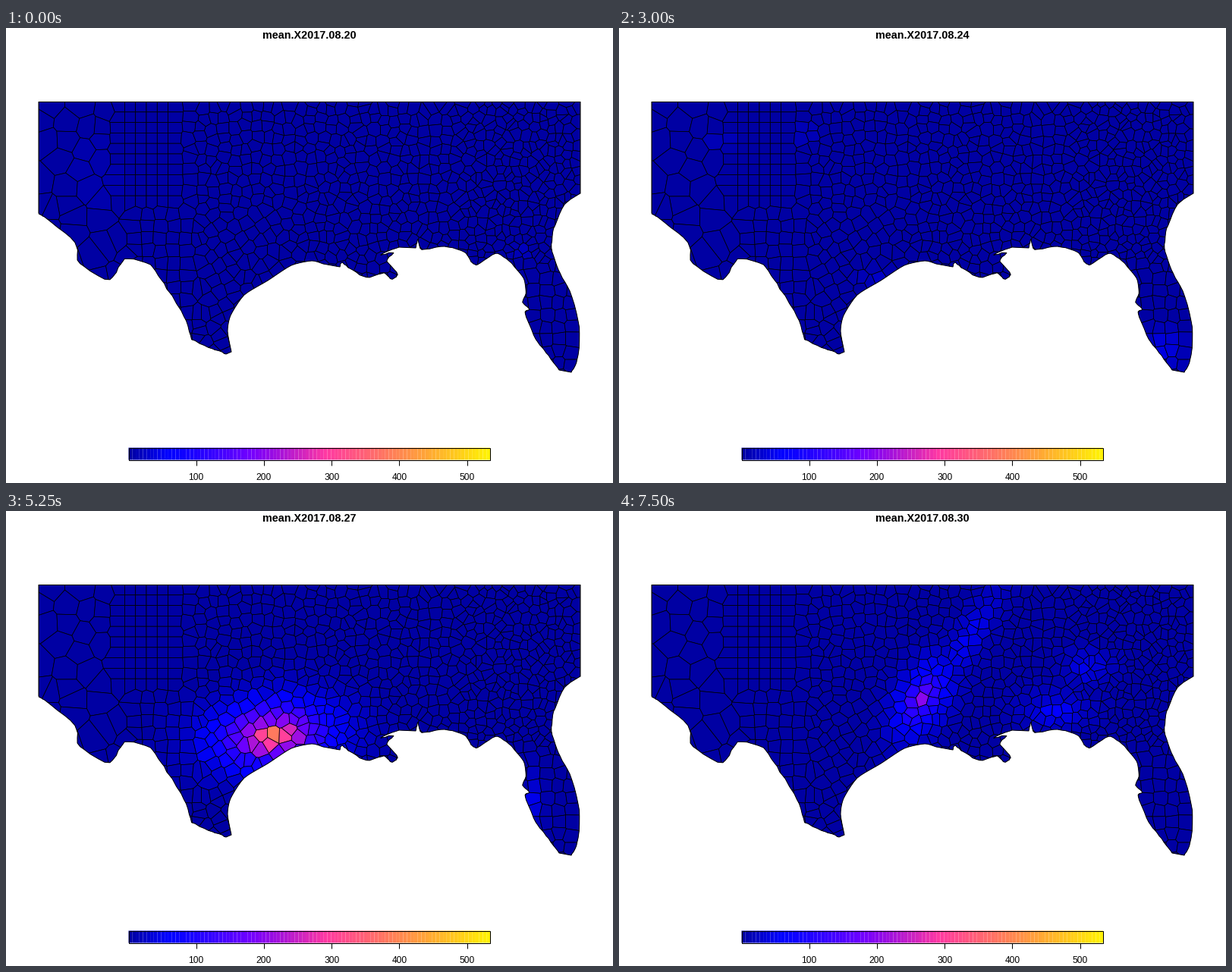
Animation, 800 px wide and 600 px high, one loop 8 s. Source, as a matplotlib script:

```python
import numpy as np
import matplotlib.pyplot as plt
from matplotlib.animation import FuncAnimation
from matplotlib.collections import PolyCollection
from matplotlib.patches import Polygon

rng = np.random.default_rng(17)
PX = 0.72            # points per pixel at 100 dpi
VMAX = 534           # top of the colour key, in millimetres
FONT = "Liberation Sans"
WEST, NORTH, EAST, SOUTH = 43, 97.5, 757, 460


def box(x0, y0, x1, y1):
    return [(x0, y0), (x1, y0), (x1, y1), (x0, y1)]


def spline(nums, rough=0, steps=5, tension=0.35):
    """Smooth curve through key points, with optional small wiggles."""
    p = np.array(nums, float).reshape(-1, 2)
    m = tension * (np.vstack([p[1:], p[-1:]]) - np.vstack([p[:1], p[:-1]]))
    t = np.linspace(0, 1, steps, endpoint=False)[:, None]
    h = 3 * t**2 - 2 * t**3
    parts = [(1 - h) * p[i] + h * p[i + 1] + (t**3 - 2 * t**2 + t) * m[i]
             + (t**3 - t**2) * m[i + 1] for i in range(len(p) - 1)]
    curve = np.vstack(parts + [p[-1:]])
    curve[1:-1] += rng.uniform(-rough, rough, curve[1:-1].shape)
    return curve


# ---- coast and borders -------------------------------------------------
atlantic = spline([757, 218, 736, 233, 722, 265, 719, 290, 728, 319, 743, 347,
                   756, 395, 753, 437, 745, 454], 0.5)
florida = spline([729, 451, 712, 428, 698, 410, 684, 376, 690, 371, 681, 362,
                  685, 350, 682, 330, 663, 307, 645, 297, 622, 312, 613, 308,
                  604, 295, 578, 288, 548, 292, 543, 279, 540, 290], 0.4)
delta = spline([518, 289, 494, 299, 511, 296, 502, 307, 516, 325, 508, 331,
                498, 323, 475, 329, 453, 317, 443, 309, 440, 315], 0.6)
gulf = spline([418, 311, 403, 307, 376, 313, 345, 333, 314, 352, 296, 379,
               292, 400, 297, 427])
river = spline([290, 430, 272, 423, 245, 410, 235, 380, 208, 337, 190, 312,
                156, 305, 137, 332, 97, 310, 91, 282, 54, 252, 43, 244], 0.8)
land = np.vstack([[(WEST, NORTH), (EAST, NORTH)],
                  atlantic, florida, delta, gulf, river])


# ---- rainfall ----------------------------------------------------------
def storm(day):
    """Eye x, y, spreads, peak and turn of the storm, drifting between key days."""
    keys = np.array([(318, 330, 34, 19, 210, -40),
                     (352, 296, 52, 30, 380, -5),
                     (384.5, 297, 27, 20, VMAX, -75),
                     (399, 248, 38, 21, 200, -60)]).T
    return [np.interp(day, [25, 27, 29, 30], k) for k in keys]


SHOWERS = {
    20: [(125, 190, 30, 50, 15), (680, 294, 10, 9, 28)],
    22: [(187, 205, 26, 16, 32), (330, 155, 55, 28, 30), (540, 115, 16, 28, 36)],
    24: [(135, 150, 18, 9, 32), (243, 137, 15, 8, 36), (338, 328, 20, 9, 42),
         (718, 422, 22, 20, 60)],
    25: [(228, 222, 18, 18, 36), (265, 142, 22, 17, 48), (708, 395, 15, 18, 90)],
    26: [(702, 385, 14, 28, 65)],
    27: [(697, 380, 10, 35, 52)],
    28: [(490, 310, 30, 16, 75)],
    29: [(482, 305, 30, 20, 70), (548, 270, 30, 22, 88)],
    30: [(460, 170, 62, 16, 66, -60), (575, 262, 35, 20, 70), (618, 206, 24, 18, 62)],
}
# scattered light rain on the days between
for d in (21, 23):
    SHOWERS[d] = [(rng.uniform(60, 740), rng.uniform(105, 230), 25, 18, 25)
                  for _ in range(6)]


def bell(pts, x, y, sx, sy, peak, turn=0):
    a = np.radians(turn)
    dx, dy = (pts - (x, y)).T
    u, w = dx * np.cos(a) + dy * np.sin(a), dy * np.cos(a) - dx * np.sin(a)
    return peak * np.exp(-np.hypot(u / sx, w / sy) ** 1.25)


# ---- counties ----------------------------------------------------------
def grid(x0, y0, x1, y1, size, jitter, turn=0):
    """Jittered, turned grid of county centres inside a box."""
    n = np.ceil(max(x1 - x0, y1 - y0) / size) + 1
    k = np.arange(-n, n) + 0.5
    g = np.stack(np.meshgrid(k, k), -1).reshape(-1, 2)
    g += rng.uniform(-jitter, jitter, g.shape)
    a = np.radians(turn)
    g = g * (size, size * 0.965) @ [[np.cos(a), np.sin(a)], [-np.sin(a), np.cos(a)]]
    g += ((x0 + x1) / 2, (y0 + y1) / 2)
    return g[((g > (x0, y0)) & (g < (x1, y1))).all(1)]


def clip(poly, n, c):
    """Keep the part of a convex polygon where p.n <= c."""
    out = []
    for i, p in enumerate(poly):
        q = poly[i - 1]
        dp = p[0] * n[0] + p[1] * n[1] - c
        dq = q[0] * n[0] + q[1] * n[1] - c
        if (dp <= 0) != (dq <= 0):
            t = dq / (dq - dp)
            out.append((q[0] + t * (p[0] - q[0]), q[1] + t * (p[1] - q[1])))
        if dp <= 0:
            out.append(p)
    return out


def voronoi(pts):
    cells = []
    for p in pts:
        cell = box(WEST, NORTH, EAST, SOUTH)
        dist = np.hypot(*(pts - p).T)
        for j in np.argsort(dist)[1:]:
            if dist[j] > 2 * max(np.hypot(x - p[0], y - p[1]) for x, y in cell):
                break
            q = pts[j]
            cell = clip(cell, q - p, (q @ q - p @ p) / 2)
        cells.append(cell)
    return cells


# wide in the desert, square on the plains, small and ragged in the east
regions = [
    (43, 97, 135, 237, 27, 0.3), (135, 97, 235, 235, 14.3, 0),
    (43, 237, 170, 345, 33, 0.3), (170, 235, 255, 435, 17, 0.12),
    (255, 235, 383, 435, 16, 0.26, -32), (235, 97, 383, 235, 14.3, 0.3),
    (383, 97, 490, 340, 13.5, 0.38), (490, 97, 600, 340, 13.3, 0.34),
    (600, 97, 757, 312, 11.6, 0.45), (650, 312, 757, 460, 17, 0.2)]
seeds = np.vstack([grid(*r) for r in regions])
for d in range(25, 31):          # one county lies right under each day's eye
    eye = np.array(storm(d)[:2])
    seeds[np.argmin(np.hypot(*(seeds - eye).T))] = eye
cells = voronoi(seeds)
vary = rng.uniform(0.82, 1.15, len(seeds))


# ---- colours -----------------------------------------------------------
def palette(n):
    """Blue, pink, yellow ramp, darkened by a display gamma."""
    i = np.linspace(0.175, 0.9, n)
    r = i / 0.32 - 0.78125
    g = 2 * i - 0.84
    b = np.minimum(4 * i, 1.84 - 2 * i)
    return np.clip(np.column_stack([r, g, b]), 0, 1) ** 1.25


COLORS = palette(100)


def shades(day):
    rain = [bell(seeds, *s) * vary for s in SHOWERS[day]]
    if day >= 25:
        rain.append(bell(seeds, *storm(day)))
    level = np.max(rain, axis=0) / VMAX * 100
    return COLORS[np.clip(level, 0, 99).astype(int)]


days = {d: shades(d) for d in range(20, 31)}

# ---- stage -------------------------------------------------------------
fig = plt.figure(figsize=(8, 6), dpi=100, facecolor="white")
ax = fig.add_axes([0, 0, 1, 1])
ax.set(xlim=(0, 800), ylim=(600, 0))
ax.axis("off")

shape = Polygon(land, fc=COLORS[0], ec="none")
ax.add_patch(shape)
counties = PolyCollection(cells, edgecolors="black", linewidths=0.75 * PX, snap=False)
ax.add_collection(counties, autolim=False)
counties.set_clip_path(shape)
ax.add_patch(Polygon(land, fill=False, ec="black", lw=PX, joinstyle="round"))

title = ax.text(400, 14, "", font=FONT, size=14.4 * PX, weight="bold", ha="center")

# colour key
L, R, T, B = 161.5, 638, 553.5, 569.5
edges = np.linspace(L, R, 101)
key = [box(a, T, b, B) for a, b in zip(edges[:-1], edges[1:])]
ax.add_collection(PolyCollection(key, facecolors=COLORS, edgecolors="none",
                                 linewidths=0, snap=False), autolim=False)
ax.add_patch(Polygon(box(L, T, R, B), fill=False, ec="black", lw=PX))
for v in range(100, 600, 100):
    x = L + (R - L) * v / VMAX
    ax.plot([x, x], [B, B + 7.2], color="black", lw=PX, solid_capstyle="butt")
    ax.text(x, 596, str(v), font=FONT, size=12 * PX, ha="center")


def update(i):
    day = 20 + i // 3
    counties.set_facecolor(days[day])
    title.set_text(f"mean.X2017.08.{day}")
    return counties, title


anim = FuncAnimation(fig, update, frames=32, interval=250, repeat=True)
plt.show()
```
